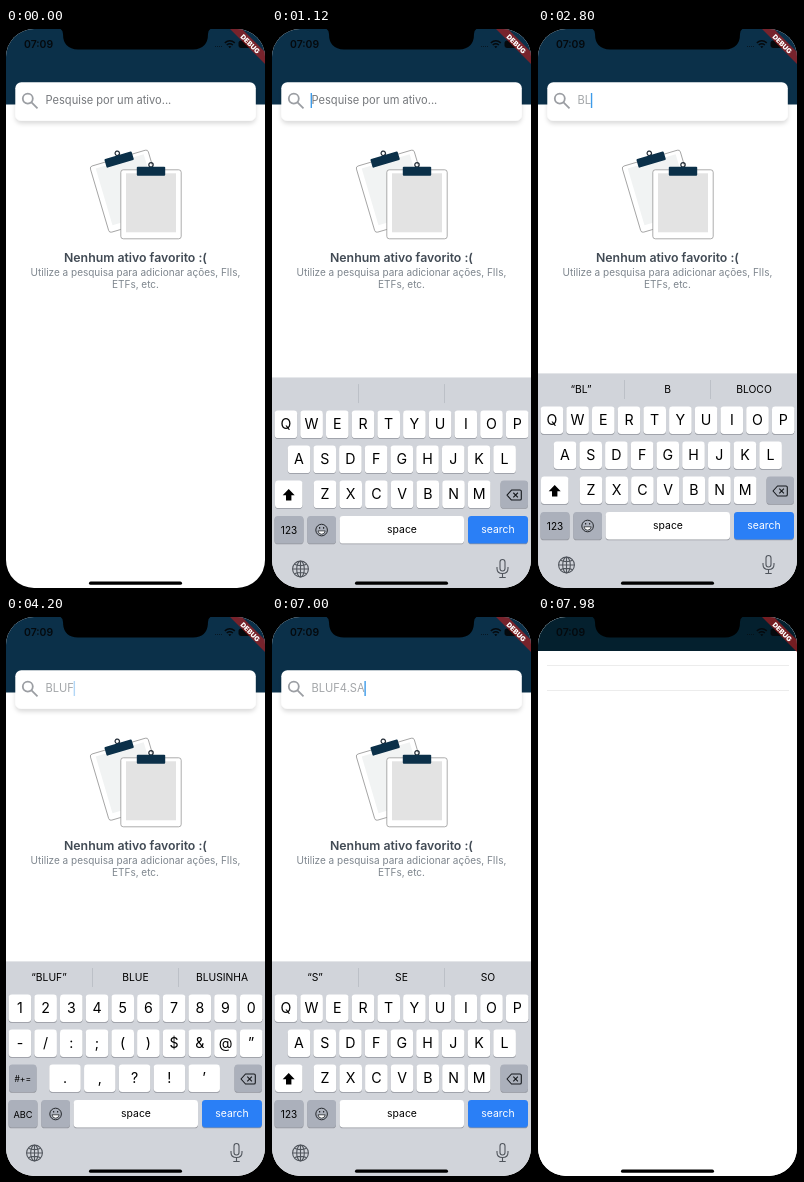
Animation, 260 px wide and 560 px high, one loop 8000 ms. Source, as an HTML page:

```html
<!DOCTYPE html>
<html lang="pt-BR">
<head>
<meta charset="utf-8">
<title>Busca de ativos</title>
<style>
  html, body { margin: 0; width: 100%; height: 100%; overflow: hidden; background: #000; }
  svg { display: block; width: 260px; height: 560px; font-family: Inter, Roboto, sans-serif; }
  .mid { text-anchor: middle; }
</style>
</head>
<body>
<svg id="stage" viewBox="0 0 260 560" xmlns="http://www.w3.org/2000/svg">
  <defs>
    <filter id="soft" x="-10%" y="-30%" width="120%" height="180%">
      <feDropShadow dx="0" dy="3" stdDeviation="2" flood-color="#000" flood-opacity=".14"/>
    </filter>
    <filter id="lift" x="-40%" y="-40%" width="180%" height="180%">
      <feDropShadow dx="0" dy="1" stdDeviation="1.5" flood-color="#000" flood-opacity=".35"/>
    </filter>
    <clipPath id="screen"><rect y="1" width="259" height="559" rx="28"/></clipPath>
    <g id="board">
      <rect x="-30.2" width="60.4" height="69" rx="2.5" fill="#fff" stroke="#8a8a8a" stroke-width=".7"/>
      <rect x="-25" y="3.5" width="50" height="59" fill="var(--paper)"/>
      <circle cy="-5" r="2.2" fill="none" stroke="#222c36" stroke-width="1.2"/>
      <rect x="-14.2" y="-3" width="28.4" height="9" rx="1" fill="#0b3049"/>
    </g>
  </defs>
  <rect width="260" height="560" fill="#000"/>
  <g clip-path="url(#screen)">
    <rect width="260" height="560" fill="#fff"/>
    <g id="home">
      <rect width="260" height="76.5" fill="#0b3049"/>
      <rect x="9.3" y="54.3" width="240.5" height="38.5" rx="6" fill="#fff" filter="url(#soft)"/>
      <g fill="none" stroke="#9b9ea3" stroke-width="1.8">
        <circle cx="21.8" cy="70.6" r="5"/><path d="M25.5 74.3l6 6"/>
      </g>
      <text id="query" x="39.5" y="76.4" font-size="11.1"></text>
      <rect id="caret" y="65" width="1.4" height="15" fill="#3d9be9"/>
      <use href="#board" transform="translate(112.7 130.1) rotate(-16.5)" style="--paper:#f1f3f3"/>
      <use href="#board" transform="translate(145 141.8)" style="--paper:#e3e3e3"/>
      <text class="mid" x="129.5" y="234.2" font-size="12.3" font-weight="600" fill="#414a54">Nenhum ativo favorito :(</text>
      <g class="mid" font-size="10" fill="#7d858d">
        <text x="129.5" y="247.7">Utilize a pesquisa para adicionar ações, FIIs,</text>
        <text x="129.5" y="259.5">ETFs, etc.</text>
      </g>
    </g>
    <g id="detail">
      <rect width="260" height="560" fill="#fff"/>
      <rect width="260" height="35" fill="#04202e"/>
      <path d="M9 49.5h242M9 74.5h242" stroke="#ececec"/>
    </g>
    <g id="keyboard"></g>
    <text x="18" y="20.2" font-size="10.4" font-weight="600" fill="#05090d">07:09</text>
    <g fill="none" stroke="#05090d">
      <path d="M218.8 14.8q5-4 10 0M220.7 17q3.1-2.4 6.2 0" stroke-width="1.5"/>
      <path d="M222.8 18.6h2l-1 1.2z" fill="#05090d" stroke-width=".8"/>
      <rect x="233" y="13" width="13" height="6.5" rx="1.8" fill="#05090d"/>
      <path d="M209 18.5h7" stroke-width="1" stroke-dasharray="1 1" opacity=".6"/>
    </g>
    <path d="M223 0h12l25 25v12z" fill="#b71c1c" fill-opacity=".63"/>
    <text class="mid" transform="translate(244 16) rotate(45)" y="2.3" font-size="6.9" font-weight="900" fill="#fff">DEBUG</text>
    <path d="M52 0q5 1 5 6q0 15 15 15.5h115q15-.5 15-15.5q0-5 5-6z" fill="#000"/>
    <rect x="83" y="553.6" width="93" height="3.2" rx="1.6" fill="#000"/>
  </g>
</svg>
<script>
const LOOP = 8000;
const PITCH = 25.7;
const ROWS = [378.5, 413.5, 448.5, 484];
const KEY_H = 27.5;
const KEYBOARD_H = 214;
const GRAY = '#abb0bb';
const HINT = 'Pesquise por um ativo...';

const FOCUS = 630, SHOW = 798, FIRST_BLINK = 1090, HIDE = 7280;
const SYMBOLS_ON = 4120, SYMBOLS_OFF = 5860;

const STROKES = [
  [2300, 'B'], [2730, 'L'], [3150, 'U'], [3550, 'F'],
  [4990, '4'], [5470, '.'], [6540, 'S'], [6930, 'A'],
].map(([at, char]) => ({ at, char }));

const HINTS = [
  [0, '', '', ''],
  [2360, '“B”', 'BEM', 'BOM'],
  [2780, '“BL”', 'B', 'BLOCO'],
  [3210, '“BLU”', 'BLU', 'BLUE'],
  [3610, '“BLUF”', 'BLUE', 'BLUSINHA'],
  [5170, '“BLUF4”', '', ''],
  [5520, '', '', ''],
  [6600, '“S”', 'SE', 'SO'],
  [7060, '“SA”', 'SALA', 'SALÁRIO'],
];

const $ = id => document.getElementById(id);
const clamp = x => Math.max(0, Math.min(1, x));
const easeInOut = x => x * x * (3 - 2 * x);
// Critically damped spring travelling from 0 to 1.
const spring = ms => {
  const x = Math.max(0, ms) * 0.01825;
  return 1 - (1 + x) * Math.exp(-x);
};

const keyAt = {};

const keyBox = (x, y, w, fill = '#fff') =>
  `<rect x="${x}" y="${y + 0.8}" width="${w}" height="${KEY_H}" rx="3.4" fill="#92959c"/>
   <rect x="${x}" y="${y}" width="${w}" height="${KEY_H}" rx="3.4" fill="${fill}"/>`;

const label = (x, y, text, size, fill = '#000') =>
  `<text class="mid" x="${x}" y="${y}" font-size="${size}" fill="${fill}">${text.replace('&', '&amp;')}</text>`;

function keyRow(chars, firstX, row, pitch = PITCH, width = 22.6) {
  const y = ROWS[row];
  return [...chars].map((char, i) => {
    const x = firstX + i * pitch;
    keyAt[char] = { x, y, width };
    return keyBox(x - width / 2, y, width) + label(x, y + 18.9, char, 14.2);
  }).join('');
}

const letters = keyRow('QWERTYUIOP', 13.9, 0) + keyRow('ASDFGHJKL', 27, 1) + keyRow('ZXCVBNM', 53, 2)
  + keyBox(3, ROWS[2], 27.5)
  + '<path d="M16.7 457l6 6.3h-3.3v5.2h-5.4v-5.2h-3.3z"/>'
  + label(17, 501.7, '123', 10);

const symbols = keyRow('1234567890', 13.9, 0) + keyRow('-/:;()$&@”', 13.9, 1)
  + keyRow('.,?!’', 59, 2, 34.8, 31.5)
  + keyBox(3, ROWS[2], 27.5, GRAY) + label(16.7, 466, '#+=', 8.5)
  + label(17, 501.5, 'ABC', 9.2);

$('keyboard').innerHTML = `
  <rect y="345.4" width="260" height="216" fill="#d1d4da"/>
  <path d="M86.5 352v19M172.5 352v19" stroke="#bcc0c7"/>
  <g id="hints">${[43, 129.5, 216].map(x => label(x, 365.3, '', 10.3)).join('')}</g>
  ${keyBox(228.5, ROWS[2], 27.5, GRAY)}
  <g fill="none" stroke="#15181c" stroke-width="1.1" stroke-linejoin="round">
    <path d="M235 463l4.5-5h8.5q1.3 0 1.3 1.3v7.4q0 1.3-1.3 1.3h-8.5z"/>
    <path d="M241.3 460.7l4.6 4.6m0-4.6l-4.6 4.6"/>
  </g>
  ${keyBox(2.5, ROWS[3], 29, GRAY)}
  ${keyBox(35.3, ROWS[3], 28.7, GRAY)}
  ${keyBox(67.6, ROWS[3], 124.4)}
  ${keyBox(196, ROWS[3], 60, '#2a7ff6')}
  ${label(130, 501.1, 'space', 10.4)}
  ${label(226, 501.1, 'search', 10.4, '#fff')}
  <g fill="none" stroke="#24272b" stroke-width="1">
    <circle cx="49.6" cy="498" r="5.8"/>
    <path d="M46 498.8h7.2q-.5 3.4-3.6 3.4t-3.6-3.4z" fill="#fff" stroke-width=".8"/>
    <path d="M47.6 495v1.6M51.6 495v1.6" stroke-width="1.2"/>
  </g>
  <g fill="none" stroke="#50555c" stroke-width="1.1">
    <circle cx="28.5" cy="537" r="7.9"/><ellipse cx="28.5" cy="537" rx="3.8" ry="7.9"/>
    <path d="M28.5 529v16M20.6 537h15.8M22.3 532.3q6.2 2.6 12.4 0M22.3 541.7q6.2-2.6 12.4 0"/>
    <rect x="228" y="527.5" width="5" height="11.5" rx="2.5"/>
    <path d="M225 535v1.5q0 5 5.5 5t5.5-5v-1.5M230.5 541.5v4M227.3 545.5h6.4"/>
  </g>
  <g id="letters">${letters}</g>
  <g id="symbols">${symbols}</g>
  <g id="popup"></g>`;

const hintNodes = [...$('hints').children];

function popupMarkup({ x, y, width }, char) {
  const left = Math.min(x - 22, 213), right = left + 44;
  const a = x - width / 2, b = x + width / 2;
  const top = y - 41, neck = y - 8, low = y + KEY_H;
  return `<path filter="url(#lift)" fill="#fff" d="M${left + 6} ${top}H${right - 6}q6 0 6 6V${neck}
    C${right} ${neck + 7} ${b} ${y - 2} ${b} ${y + 5}V${low - 3}q0 3-3 3H${a + 3}q-3 0-3-3V${y + 5}
    C${a} ${y - 2} ${left} ${neck + 7} ${left} ${neck}V${top + 6}q0-6 6-6z"/>`
    + label((left + right) / 2, y - 14, char, 23);
}

// Half a second per state, each change fading over 250 ms.
function caretOpacity(t, since) {
  const age = t - since;
  if (age < 500) return 1;
  const fade = clamp((age % 500) / 250);
  return Math.floor(age / 500) % 2 ? 1 - fade : fade;
}

const toggle = (id, on) => { $(id).style.display = on ? '' : 'none'; };

function render(t) {
  const typed = STROKES.filter(s => s.at <= t);
  const word = typed.map(s => s.char).join('');
  const query = $('query');
  query.textContent = word || HINT;
  query.setAttribute('fill', word ? '#a3a6a9' : '#75787c');

  const caretX = word ? 39.3 + query.getComputedTextLength() : 38.6;
  const since = typed.length ? typed[typed.length - 1].at : FIRST_BLINK;
  $('caret').setAttribute('x', caretX);
  $('caret').setAttribute('opacity', t >= FOCUS && t < HIDE ? caretOpacity(t, since) : 0);

  const hints = HINTS.filter(h => h[0] <= t).pop();
  hintNodes.forEach((node, i) => { node.textContent = hints[i + 1]; });

  const symbolic = t >= SYMBOLS_ON && t < SYMBOLS_OFF;
  toggle('letters', !symbolic);
  toggle('symbols', symbolic);

  const pressed = STROKES.find(s => t >= s.at - 110 && t < s.at + 40);
  $('popup').innerHTML = pressed ? popupMarkup(keyAt[pressed.char], pressed.char) : '';

  const raised = spring(t - SHOW) - spring(t - HIDE);
  $('keyboard').setAttribute('transform', `translate(0 ${KEYBOARD_H * (1 - raised)})`);
  toggle('keyboard', raised > 0.002);

  $('detail').setAttribute('opacity', easeInOut(clamp((t - 7580) / 340)));
}

const start = performance.now();
function tick() {
  render((performance.now() - start) % LOOP);
  requestAnimationFrame(tick);
}
tick();
</script>
</body>
</html>
```
